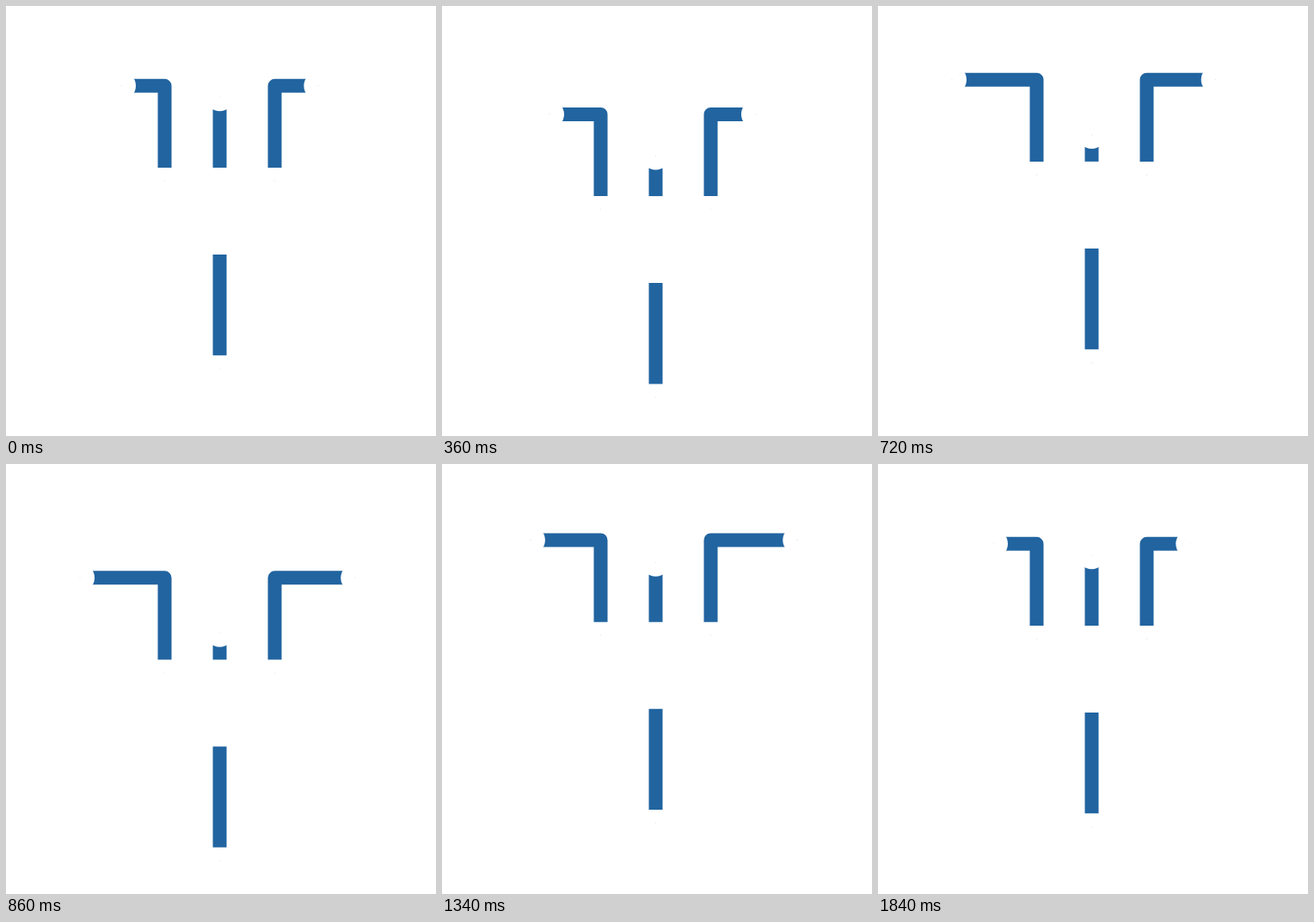
Recreate the animation shown at these times as an HTML page with a canvas. Size 500 px wide and 500 px high, loop 2 s.

```html
<!DOCTYPE html>
<html lang="en">
<head>
<meta charset="utf-8">
<title>Bouncing lines</title>
<style>
  html, body { margin: 0; width: 100%; height: 100%; overflow: hidden; background: #fff; }
  canvas { display: block; width: 500px; height: 500px; }
</style>
</head>
<body>
<canvas id="stage" width="500" height="500"></canvas>
<script>
const ctx = document.getElementById('stage').getContext('2d');
const LOOP = 2000, STEP = 20, LAST = 1840;
const BLUE = '#2164a0', DOT = '#e2e2e2';

// [time, value] pairs, eased with a half cosine between neighbours
const bounce = [[0, 85], [281, 127], [621, 57], [889, 126.5], [1197, 68], [1515, 98], [1720, 85]];
const leftEnd = [[245, 149], [648, 101], [1005, 101], [1833, 149]];
const stemTop = [[60, 36], [540, 87], [981, 87], [1521, 36]];
const rightFall = [[1340, 1], [1700, 0]];

function ease(keys, t) {
  if (t <= keys[0][0]) return keys[0][1];
  for (let i = 1; i < keys.length; i++) {
    const [t0, v0] = keys[i - 1], [t1, v1] = keys[i];
    if (t < t1) return v0 + (v1 - v0) * (1 - Math.cos(Math.PI * (t - t0) / (t1 - t0))) / 2;
  }
  return keys[keys.length - 1][1];
}

function rightEnd(t) {
  const rise = 1 / (1 + Math.exp(-0.0104 * (t - 686)));
  return 348 + 50 * rise * ease(rightFall, t);
}

function line(...pts) {
  ctx.beginPath();
  pts.forEach(([x, y]) => ctx.lineTo(x, y));
  ctx.stroke();
}

function disc(x, y, r, color) {
  ctx.fillStyle = color;
  ctx.beginPath();
  ctx.arc(x, y, r, 0, 2 * Math.PI);
  ctx.fill();
}

// white disc that bites a shallow hollow into a line end
function bite(x, y, r) {
  disc(x, y, r, '#fff');
  disc(x, y, 0.6, DOT);
}

function draw(t) {
  const y = ease(bounce, t), arm = y + 7.8, foot = y + 103;
  const left = ease(leftEnd, t), right = rightEnd(t), top = y + ease(stemTop, t);

  ctx.fillStyle = '#fff';
  ctx.fillRect(0, 0, 500, 500);
  ctx.strokeStyle = BLUE;
  ctx.lineWidth = 16;
  ctx.lineJoin = 'round';

  line([left - 2, arm], [184.5, arm], [184.5, foot]);
  line([right + 2, arm], [312.5, arm], [312.5, foot]);
  line([248.5, top - 1], [248.5, foot]);
  line([248.5, y + 204], [248.5, y + 321.3]);

  bite(left - 15, arm, 17);
  bite(right + 15, arm, 16.7);
  bite(248.5, top - 15, 16.2);
  disc(184.5, y + 118.5, 0.6, DOT);
  disc(312.5, y + 118.5, 0.6, DOT);
  disc(248.5, y + 337, 0.6, DOT);
}

const start = performance.now();
function tick() {
  const t = (performance.now() - start) % LOOP;
  draw(Math.min(LAST, Math.floor(t / STEP) * STEP));
  requestAnimationFrame(tick);
}
tick();
</script>
</body>
</html>
```
